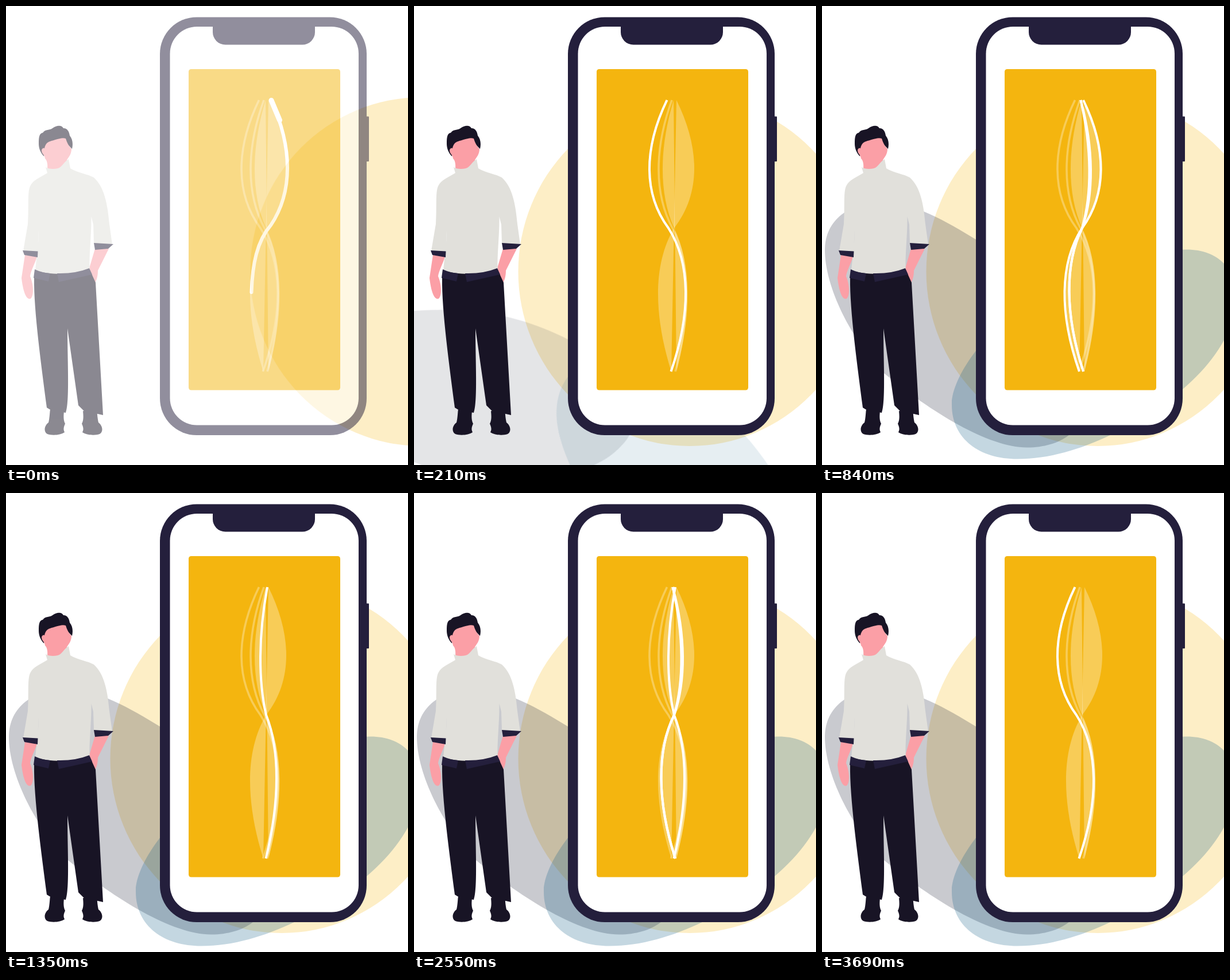
These frames come from a looping animation (700 px wide and 800 px high, 3870 ms). An HTML page:

```html
<!DOCTYPE html>
<html lang="en">
<head>
<meta charset="utf-8">
<title>Strands</title>
<style>
  html, body { margin: 0; width: 100%; height: 100%; overflow: hidden; background: #fff; }
  svg { display: block; width: 700px; height: 800px; }
  .navy { fill: #241f3c; }
  .ink { fill: #181425; }
  .skin { fill: #fb9fa6; }
  .wool { fill: #e1e0db; }
  #slate { transform-origin: 233px 555px; }
  #teal { transform-origin: 475px 607px; }
  #strands { fill: none; stroke: #fff; }
  #strands .area { fill: #fff; stroke: none; opacity: .3; }
  #strands .faint { stroke-width: 3.6; opacity: .3; }
  #strands .line { stroke-width: 4; }
  #strands .bold { stroke-width: 6; stroke-linecap: round; }
  #strands .tip { stroke-width: 9; stroke-linecap: round; }
</style>
</head>
<body>
<svg viewBox="0 0 700 800">
  <ellipse id="sun" cx="480" cy="463" rx="298.500" ry="304" fill="#f4b50f" fill-opacity=".235"/>
  <path id="slate" fill="#282d40" fill-opacity=".25" d="M5 425C5 373 48 342 104 342C160 342 215 375 268 407C370 470 458 600 458 690C458 740 415 769.500 357 769.500C290 769.500 190 708 108 640C50 580 5 490 5 425Z"/>
  <path id="teal" fill="#175f87" fill-opacity=".25" d="M226 695C226 615 390 424.500 635 424.500C690 424.500 722 460 722 505C722 585 645 680 504 747C450 773 395 789.500 340 789.500C275 789.500 226 755 226 695Z"/>

  <g id="man">
    <path class="skin" d="M33 434L54 437C50 450 43 462 42 471C48 485 49 505 43 510C36 513 30 500 27 474Z"/>
    <path class="skin" d="M155 423L179 423L160 461C160 470 158 478 155 482L148 470L145 457Z"/>
    <path class="ink" d="M49 474L52 462L146 460L156 482L169 713L160 711L136 706L126 696L107 562C107 620 111 690 104 709L76 703L71 700C62 630 48 530 49 474Z"/>
    <path id="shoe" class="ink" d="M77 702L101 706C100 716 100 722 103 728C101 733 99 737 102 743C95 748 80 749 72 746C64 741 68 730 74 726C76 718 76 710 77 702Z"/>
    <use href="#shoe" transform="translate(235 0) scale(-1 1)"/>
    <path class="ink" d="M57 240C57 228 58 222 64 221C69 214 76 217 81 213C90 207 97 208 100 213C107 213 110 219 111 226C116 232 117 240 115 249L104 238L68 250L66 262C60 256 57 248 57 240Z"/>
    <path class="skin" d="M67 248C70 235 78 236 86 233C93 231 99 229 104 231C106 238 110 245 114 249C114 258 109 264 106 268C108 280 100 286 88 285L72 284C73 275 71 268 68 266C67 258 62 258 62 251Q64 246 67 248Z"/>
    <path class="wool" d="M69 281C74 284 82 285 90 283C98 281 101 271 109 267L112 283C125 291 143 293 153 299C171 315 177 345 180 380L185 416L153 414L152 381L148.500 367C149 400 144 440 146 459C120 469 75 469 51 461C53 440 57 410 57 391L55 428L30 427L38 380C40 350 37 325 42 314C47 303 58 300 72 291Z"/>
    <path class="navy" d="M50 459Q63 465 77 466L74 480L48 474ZM89 466Q120 467 145 457L150 468L92 481Z"/>
    <path class="navy" d="M29 426L55.500 427.500L55 438L32 434ZM153 413L187 415L178 423L155 425Z"/>
  </g>

  <g id="phone">
    <rect class="navy" x="625" y="192.500" width="7" height="78.500" rx="1"/>
    <rect class="navy" x="268" y="19.500" width="360" height="728.500" rx="64"/>
    <rect x="285.500" y="36" width="328.500" height="694.500" rx="47" fill="#fff"/>
    <path class="navy" d="M360 34H538V45A22 22 0 0 1 516 67.500H382A22 22 0 0 1 360 45Z"/>
    <rect x="318" y="110" width="264" height="559.500" rx="4.500" fill="#f4b50f"/>
    <g id="strands"></g>
  </g>
</svg>
<script>
const LOOP = 3870;
const $ = id => document.getElementById(id);

function play(el, frames) {
  el.animate(frames.map(({ t, ...f }) => ({ offset: t / LOOP, ...f })),
    { duration: LOOP, iterations: Infinity });
}

// Goes from one value to another between two times and holds outside them.
function tween(el, prop, start, end, from, to, easing = 'linear') {
  play(el, [
    { t: 0, [prop]: from },
    { t: start, [prop]: from, easing },
    { t: end, [prop]: to },
    { t: LOOP, [prop]: to }
  ]);
}

const pose = (turn, x, y) => `rotate(${turn}deg) translate(${x}px, ${y}px)`;

tween($('sun'), 'transform', 0, 180, 'translateX(246px)', 'translateX(0px)', 'ease-out');
tween($('slate'), 'transform', 0, 420, pose(-64, -332, 76), pose(0, 0, 0), 'ease-in-out');
tween($('teal'), 'transform', 120, 760, pose(78, 225, 70), pose(0, 0, 0), 'ease-in');
tween($('slate'), 'opacity', 105, 315, 0, 1);
tween($('teal'), 'opacity', 120, 330, 0, 1);
for (const id of ['man', 'phone']) tween($(id), 'opacity', 0, 120, .5, 1);

// S-shaped curve: top, upper bulge, crossing, lower bulge, bottom
function curve(x0, b1, xm, b2, x1) {
  const c = (8 * b1 - x0 - xm) / 6, e = (8 * b2 - xm - x1) / 6;
  return `M${x0} 164C${c} 249 ${c} 328 ${xm} 387C${e} 448 ${e} 537 ${x1} 637`;
}

function add(cls, d) {
  const el = document.createElementNS('http://www.w3.org/2000/svg', 'path');
  el.setAttribute('class', cls);
  el.setAttribute('d', d);
  $('strands').append(el);
  return el;
}

const left = curve(440.5, 410, 443, 473, 447.5);
const near = curve(449, 426, 450, 474.5, 455);

add('area', curve(452, 433, 453, 476, 457));
add('area', curve(457, 488, 453, 425, 448));
add('faint', left);
add('faint', near);

const lit = {
  a: [add('line', left)],
  b: [add('line', near)],
  c: [add('line', curve(455, 443, 453, 471, 452.5))],
  // two close curves make a stroke that swells in the middle
  e: [465.5, 468].map(x => add('line', curve(450.5, x, 453, 430.5, 455))),
  d: [add('line', curve(455, 485.5, 453, 422.5, 448))],
  t: [add('bold', 'M462 165C499 246 500 324 461 382C437 410 429 450 427.500 499'),
      add('tip', 'M462 164.500L476.500 199')]
};

// The light sweeps across the strands and back, each step lapping over the next.
const order = 't a b c e d e c b a at a b c e d e c b a a'.split(' ');
const LAP = 55;
const startOf = i => Math.max(0, i < 6 ? 170 * i - 20 : 180 * i + 25);

function spansOf(key) {
  const spans = [];
  order.forEach((keys, i) => {
    if (!keys.includes(key)) return;
    const start = startOf(i);
    const end = i + 1 < order.length ? startOf(i + 1) + LAP : LOOP;
    const last = spans[spans.length - 1];
    if (last && last[1] >= start) last[1] = end;
    else spans.push([start, end]);
  });
  return spans;
}

for (const key in lit) {
  const spans = spansOf(key), easing = 'steps(1, end)';
  const frames = [{ t: 0, opacity: 0, easing }];
  for (const [start, end] of spans) {
    frames.push({ t: start, opacity: 1, easing }, { t: end, opacity: 0, easing });
  }
  frames.push({ t: LOOP, opacity: 0 });
  lit[key].forEach(el => play(el, frames));
}
</script>
</body>
</html>
```
